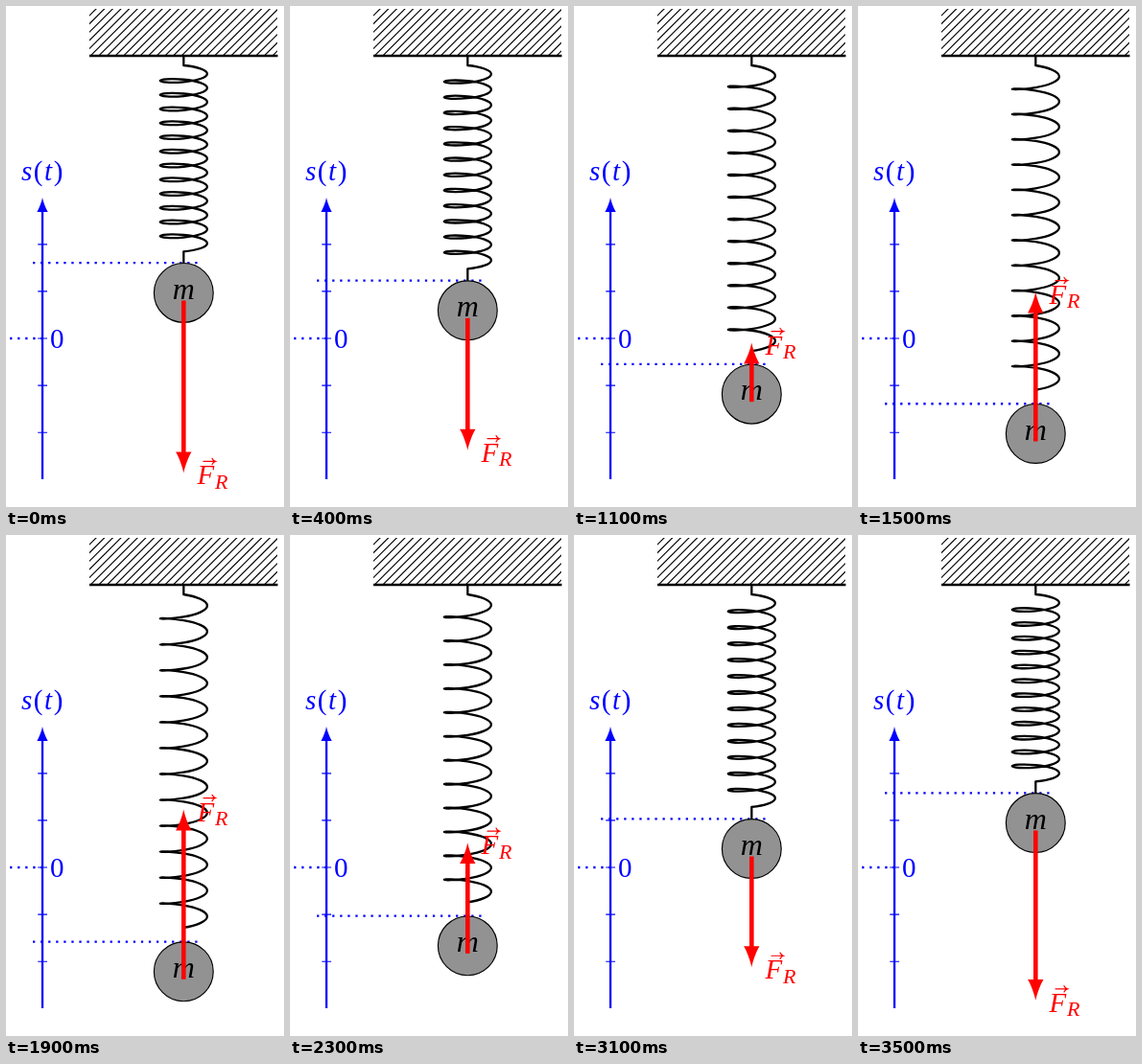
These frames come from a looping animation (290 px wide and 523 px high, 3.6 s). An HTML page:

```html
<!DOCTYPE html>
<html lang="en">
<head>
<meta charset="utf-8">
<title>Spring oscillator</title>
<style>
  html, body { margin: 0; width: 100%; height: 100%; overflow: hidden; background: #fff; }
  svg { display: block; width: 100%; height: 100%; }
  text { font-family: "Liberation Serif", "Times New Roman", serif; font-size: 29px; }
  .it { font-style: italic; }
  .line { fill: none; stroke-width: 2.3; }
  .thin { fill: none; stroke-width: 1.15; }
  .dots { fill: none; stroke: #00f; stroke-width: 2.3; stroke-dasharray: 2.3 5.76; }
</style>
</head>
<body>
<svg viewBox="0 0 290 523">
  <clipPath id="wall"><rect x="87" y="3" width="196" height="49"/></clipPath>
  <path id="hatch" class="thin" stroke="#000" clip-path="url(#wall)"/>
  <path class="line" stroke="#000" d="M87 52H283.5"/>

  <path class="dots" d="M-4 347H38"/>
  <path class="line" stroke="#00f" d="M38 494V213"/>
  <path id="axisHead" fill="#00f"/>
  <path id="ticks" class="thin" stroke="#00f"/>
  <text x="38.5" y="182" fill="#00f" text-anchor="middle" letter-spacing="1.6"><tspan class="it">s</tspan>(<tspan class="it">t</tspan>)</text>
  <text x="46" y="356.5" fill="#00f">0</text>

  <path id="spring" class="line" stroke="#000" stroke-linejoin="round"/>
  <path id="level" class="dots" d="M28 0H201"/>
  <g id="ball">
    <circle cx="185.3" cy="31.2" r="30.9" fill="#929292" stroke="#000" stroke-width="1.15"/>
    <text class="it" x="185.3" y="37.5" text-anchor="middle" style="font-size:32px">m</text>
  </g>
  <g id="force">
    <path id="shaft" fill="none" stroke="#f00" stroke-width="4.6"/>
    <path id="head" fill="#f00"/>
  </g>
  <g id="label">
    <text class="it" x="199.5" y="12">F</text>
    <text class="it" x="218" y="16.6" style="font-size:22px">R</text>
    <path fill="none" stroke="currentColor" stroke-width="1.2" stroke-linecap="round"
      d="M206 -12H218.5M215 -15.2Q216 -12.7 218.5 -12Q216 -11.3 215 -8.8"/>
  </g>
</svg>
<script>
  const $ = id => document.getElementById(id);
  const CX = 185.3, REST = 347, UNIT = 49.1, AMP = 78.8;
  const STEP = 100, STEPS = 36, COILS = 12, RADIUS = 24.6, LEAN = 4.95;
  const PULL = 180;

  // Curved arrowhead with its point at (x, y); dir is 1 for down, -1 for up.
  function arrowHead(x, y, dir, k) {
    const p = (along, side) => `${x + side * k} ${y + (along - 9) * k * dir}`;
    return `M${p(9, 0)}C${p(6.33, .5)} ${p(2, 2)} ${p(-1, 3.75)}` +
      `L${p(-1, -3.75)}C${p(2, -2)} ${p(6.33, -.5)} ${p(9, 0)}Z`;
  }

  // One turn: [lean, side] control points, evenly advanced along the spring.
  const TURN = [
    [0, .555], [.445, 1], [1, 1], [1.555, 1], [2, .555], [2, 0],
    [2, -.555], [1.555, -1], [1, -1], [.445, -1], [0, -.555], [0, 0]
  ];

  function springPath(top) {
    const pitch = 14.75 + (top - 268.2) * .0786;
    let d = `M${CX} 52V62`;
    for (let i = 0; i <= COILS; i++) {
      const points = i < COILS ? TURN : TURN.slice(0, 6);
      d += "C" + points.map(([lean, side], j) =>
        `${CX + side * RADIUS} ${62 + lean * LEAN + (i + (j + 1) / 12) * pitch}`).join(" ");
    }
    return d + `V${top}`;
  }

  function draw(step) {
    const s = Math.cos(step / STEPS * 2 * Math.PI);
    const top = REST - AMP * s;
    const start = top + 39.2, tip = start + PULL * s;
    const dir = Math.sign(s), still = Math.abs(s) < 1e-6;

    $("spring").setAttribute("d", springPath(top));
    $("level").setAttribute("transform", `translate(0 ${top})`);
    $("ball").setAttribute("transform", `translate(0 ${top})`);
    $("force").setAttribute("visibility", still ? "hidden" : "visible");
    $("shaft").setAttribute("d", `M${CX} ${start}V${tip - 20 * dir}`);
    $("head").setAttribute("d", arrowHead(CX, tip, dir, 2.19));
    $("label").setAttribute("transform", `translate(0 ${tip})`);
    const ink = still ? "#7a0c0c" : "#f00";
    $("label").setAttribute("fill", ink);
    $("label").setAttribute("color", ink);
  }

  let hatch = "", ticks = "";
  for (let x = 45; x < 284; x += 8.63) hatch += `M${x - 3} 55L${x + 52} 0`;
  for (let i = -2; i <= 2; i++) ticks += `M33.2 ${REST + i * UNIT}h9.8`;
  $("hatch").setAttribute("d", hatch);
  $("ticks").setAttribute("d", ticks);
  $("axisHead").setAttribute("d", arrowHead(38, 200, -1, 1.5));

  const began = performance.now();
  let shown = -1;
  function tick() {
    const step = Math.floor((performance.now() - began) / STEP) % STEPS;
    if (step !== shown) draw(shown = step);
    requestAnimationFrame(tick);
  }
  tick();
</script>
</body>
</html>
```
